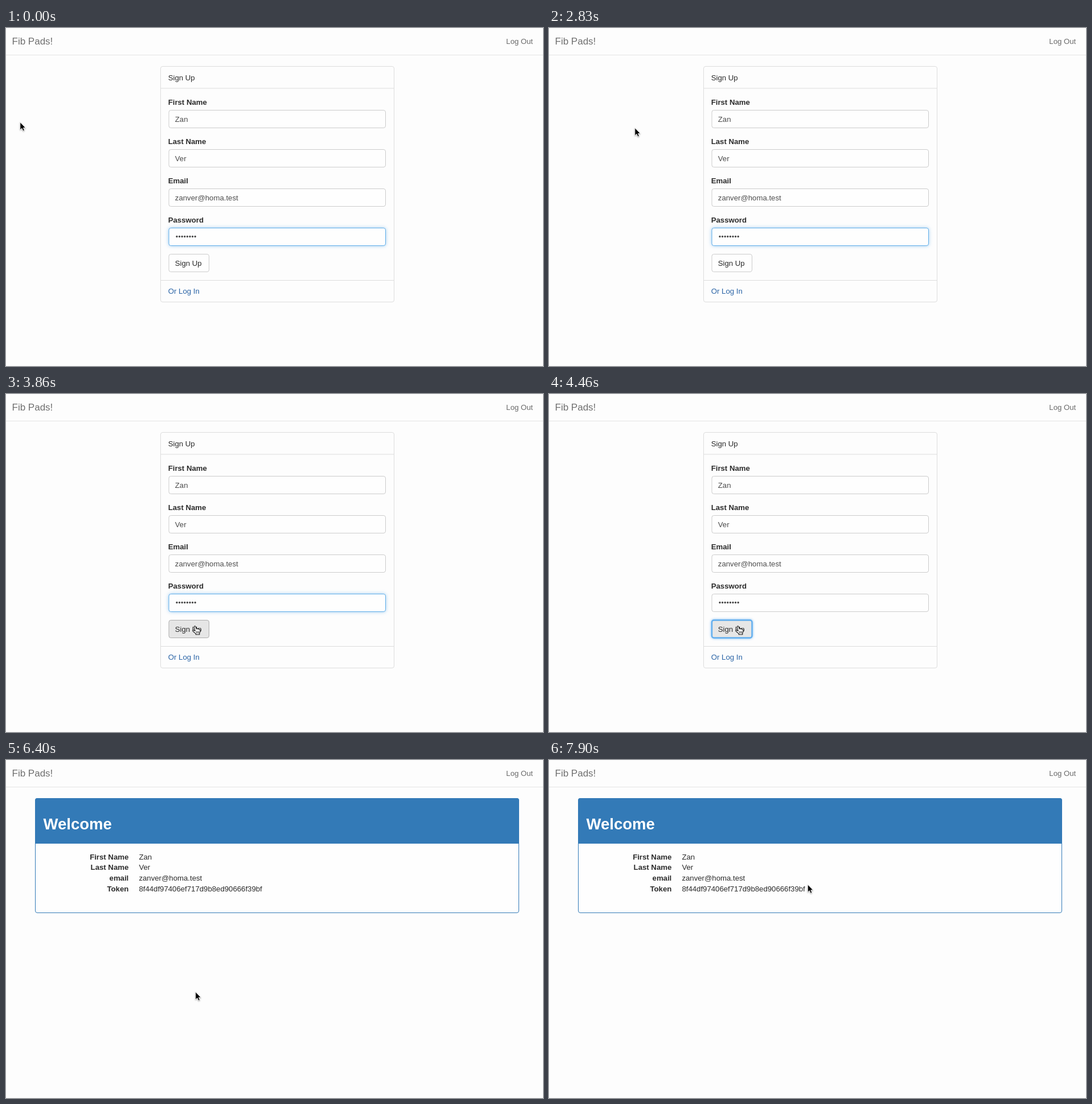
Write an HTML page that moves like this. It is 943 by 594 pixels and loops after 8 s.

```html
<!DOCTYPE html>
<html lang="en">
<head>
<meta charset="utf-8">
<title>Sign Up</title>
<style>
  html, body { margin: 0; width: 100%; height: 100%; overflow: hidden; background: #fdfdfd; }
  svg { display: block; width: 943px; height: 594px; }
  text { font: 13.2px "Liberation Sans", Arial, sans-serif; fill: #2b2b2b; white-space: pre; }
  .brand { font-size: 17px; fill: #6f6f6f; }
  .nav { fill: #6a6a6a; }
  .bold { font-weight: bold; }
  .right { text-anchor: end; }
  .value { fill: #4c4c4c; }
  .link { fill: #2a64a6; }
  .heading { font-size: 27.5px; font-weight: bold; fill: #fff; }
  .panel { fill: #fdfdfd; stroke: #ddd; }
  .rule { stroke: #ddd; }
  .box { fill: #fefefe; stroke: #ccc; }
  .focus { stroke: #5fade9; filter: drop-shadow(0 0 3px rgba(102, 175, 233, .6)); }
  #button.hover { fill: #e6e6e6; stroke: #adadad; }
  #button.ring { fill: #e6e6e6; stroke: #62aeee; stroke-width: 2.4; filter: drop-shadow(0 0 2px rgba(80, 165, 240, .75)); }
  #button.down { fill: #d4d4d4; }
  .hidden { display: none; }
  #arrow { filter: drop-shadow(0 1px 1px rgba(0, 0, 0, .35)); }
</style>
</head>
<body>
<svg viewBox="0 0 943 594">
  <rect width="943" height="594" fill="#fdfdfd"/>
  <path d="M0 47.5H943" stroke="#e4e4e4"/>
  <text class="brand" x="10.5" y="29">Fib Pads!</text>
  <text class="nav" x="878.3" y="28">Log Out</text>

  <g id="form">
    <rect class="panel" x="271.5" y="67.5" width="410" height="414" rx="3.5"/>
    <path class="rule" d="M272 106H681M272 443.5H681"/>
    <text x="284.7" y="91.5">Sign Up</text>
    <g id="fields"></g>
    <g id="dots" fill="#484848"></g>
    <path id="caret" d="M334.5 360V375" stroke="#333"/>
    <rect id="button" class="box" x="286" y="397.5" width="70.5" height="31" rx="3.5"/>
    <text x="296.7" y="417.5">Sign Up</text>
    <text class="link" x="284.8" y="467">Or Log In</text>
  </g>

  <g id="welcome">
    <rect x="51.5" y="67.5" width="849" height="201" rx="3.5" fill="#fefefe" stroke="#337ab7"/>
    <path d="M51 147V71a4 4 0 0 1 4-4H897a4 4 0 0 1 4 4V147Z" fill="#337ab7"/>
    <text class="heading" x="65.5" y="121.5">Welcome</text>
    <g id="details"></g>
  </g>

  <g id="cursor">
    <path id="arrow" d="M.3 0V13.6L3.4 10.8L5.5 15.5L7.9 14.5L5.9 9.9H9.9Z"
      fill="#000" stroke="#fff" stroke-width=".9" stroke-linejoin="round"/>
    <g id="hand" fill="#fff" stroke="#111" stroke-width="1.1" stroke-linejoin="round" stroke-linecap="round">
      <path d="M4.7 9.6L3 3Q2.7 1 4 .8Q5.2.7 5.7 2.3L7 6Q8.4 4.6 9.4 6.1Q10.8 5.1 11.6 6.7Q13.3 6.2 13.5 8.2Q13.7 11.4 12.3 13.3V15.7H5.8V14.1L1 10.2Q-.1 8.7 1 8Q2.2 7.4 3.4 8.8Z"/>
      <path d="M7 10V13.4M9 10V13.4M11 10V13.4" stroke-width=".8"/>
    </g>
    <path id="beam" d="M.8.7Q3.6.7 3.9 2.5Q4.2.7 7 .7M3.9 2V14M.8 15.3Q3.6 15.3 3.9 13.5Q4.2 15.3 7 15.3M2.6 9.8H5.2"
      fill="none" stroke="#222"/>
  </g>
</svg>
<script>
const LOOP = 8000;
const $ = id => document.getElementById(id);

const first = "Zan", last = "Ver", email = "zanver@homa.test";

function add(parent, tag, attrs, text = "") {
  const el = document.createElementNS("http://www.w3.org/2000/svg", tag);
  for (const key in attrs) el.setAttribute(key, attrs[key]);
  el.textContent = text;
  $(parent).append(el);
  return el;
}

const inputs = [["First Name", first], ["Last Name", last], ["Email", email], ["Password", ""]].map(([label, value], i) => {
  const y = 144 + Math.round(i * 69.1);
  add("fields", "text", { class: "bold", x: 284.7, y: y - 9.4 }, label);
  const box = add("fields", "rect", { class: "box", x: 286, y: y + .5, width: 380.5, height: 31, rx: 3.5 });
  add("fields", "text", { class: "value", x: 296.8, y: y + 20.5 }, value);
  return box;
});
const password = inputs[3];

for (let i = 0; i < 8; i++) add("dots", "circle", { cx: 300 + i * 4.6, cy: 366.5, r: 1.65 });

[["First Name", first], ["Last Name", last], ["email", email], ["Token", "8f44df97406ef717d9b8ed90666f39bf"]].forEach(([label, value], i) => {
  const y = 174.7 + i * 18.7;
  add("details", "text", { class: "bold right", x: 215.3, y }, label);
  add("details", "text", { x: 233.4, y }, value);
});

// time, cursor shape, x, y
const moves = [
  [0, "arrow", 24.5, 165.5], [1790, "arrow", 36, 167], [1940, "arrow", 85.5, 136.5],
  [2090, "arrow", 122, 115.5], [2540, "arrow", 121, 113.5], [2830, "arrow", 150.5, 175.5],
  [2980, "arrow", 218.5, 315.5], [3130, "arrow", 314.5, 388.5], [3270, "hand", 317.5, 402.5],
  [3420, "hand", 327.5, 406.5], [3570, "hand", 327.5, 407],
  [6400, "arrow", 332.5, 407.5], [7150, "arrow", 335, 400.5], [7300, "arrow", 406, 263.5],
  [7600, "arrow", 436.5, 244.5], [7750, "beam", 441, 224], [7900, "arrow", 454, 218.8]
];
const blinks = [300, 900, 1340, 1790, 2390, 2830, 3270, 3860];

const show = (id, on) => $(id).classList.toggle("hidden", !on);

function draw(t) {
  show("form", t < 4760);
  show("welcome", t >= 4760);
  show("caret", blinks.filter(b => b <= t).length % 2);
  password.classList.toggle("focus", t < 4460);

  const button = $("button").classList;
  button.toggle("hover", t >= 3270);
  button.toggle("ring", t >= 4310);
  button.toggle("down", t >= 4310 && t < 4460);

  const [, shape, x, y] = moves.findLast(m => m[0] <= t);
  for (const id of ["arrow", "hand", "beam"]) show(id, id === shape);
  $("cursor").setAttribute("transform", `translate(${x} ${y})`);
}

function tick() {
  draw(performance.now() % LOOP);
  requestAnimationFrame(tick);
}
tick();
</script>
</body>
</html>
```
